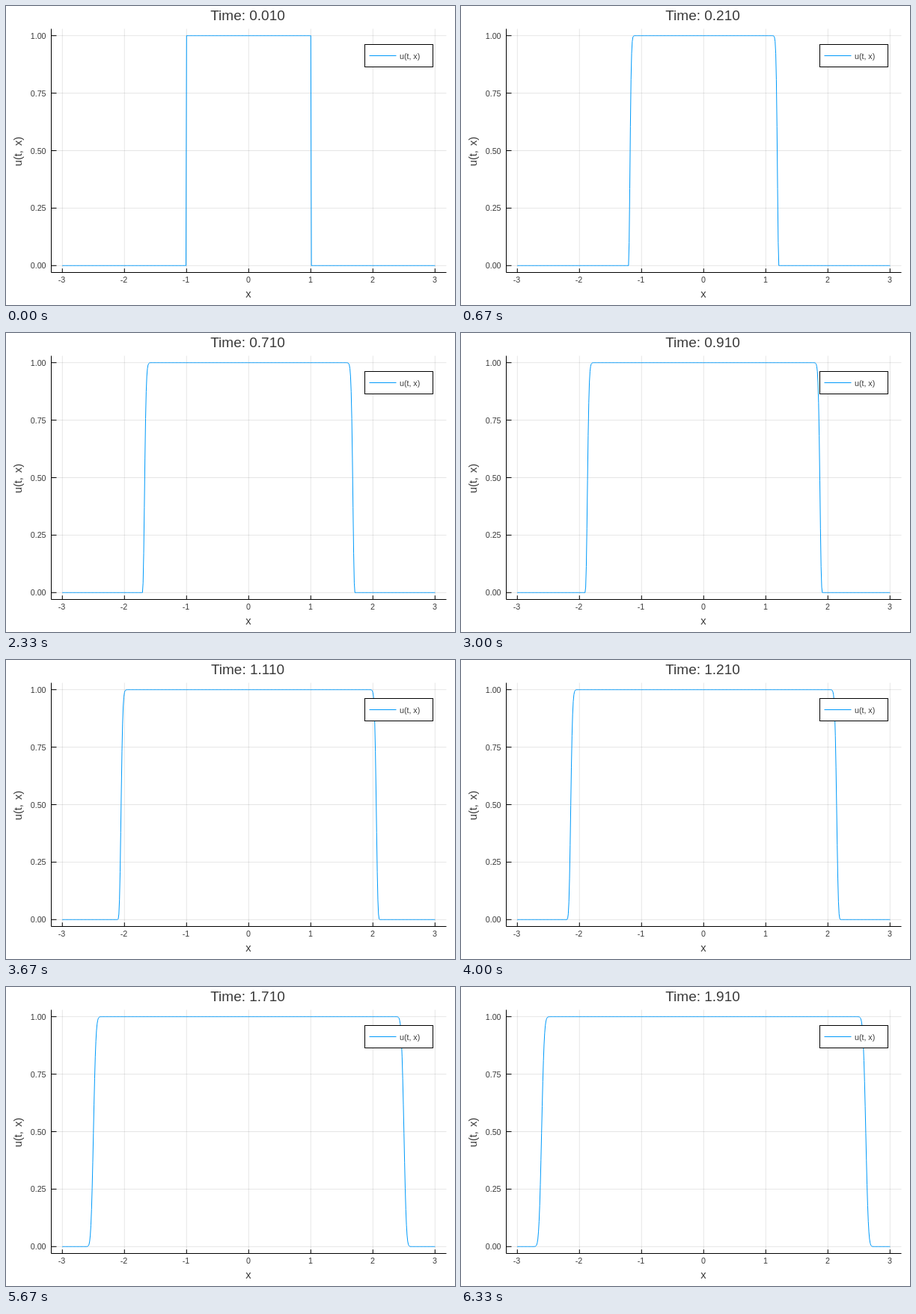
An HTML page that plays this animation: 600x400 px, repeating every 6660 ms.

```html
<!DOCTYPE html>
<html lang="en">
<head>
<meta charset="utf-8">
<title>Advection</title>
<style>
html, body { margin: 0; width: 100%; height: 100%; overflow: hidden; background: #fff; }
svg { display: block; width: 600px; height: 400px; }
text { font-family: "Liberation Sans", Arial, sans-serif; font-size: 10.67px; fill: #3a3a3a; }
path, rect { fill: none; stroke-width: 1; }
.mid { text-anchor: middle; }
.end { text-anchor: end; }
.label { font-size: 14.67px; }
.axis { stroke: #000; }
.grid { stroke: #000; stroke-opacity: .1; }
.curve { stroke: #009afa; stroke-linejoin: round; }
</style>
</head>
<body>
<svg viewBox="0 0 600 400">
  <text id="title" class="mid" x="323" y="19" style="font-size:19px"></text>
  <path id="grid" class="grid"/>
  <path id="ticks" class="axis"/>
  <path class="axis" d="M60.5 30.5V356.5H588.5"/>
  <g id="labels"></g>
  <text class="mid label" x="324" y="389.5">x</text>
  <text class="mid label" transform="translate(20.5 194.5) rotate(-90)" style="word-spacing:2px">u(t, x)</text>
  <path id="curve" class="curve"/>
  <rect class="axis" x="479.5" y="51.5" width="91" height="30" style="fill:#fff"/>
  <path class="curve" d="M485.5 66.5H521.5"/>
  <text x="526" y="71">u(t, x)</text>
</svg>
<script>
const $ = id => document.getElementById(id);
const LOOP = 6660, FRAMES = 20, STEPS = 10, CELLS = 600, H = 0.01;
const px = x => 324.3 + 83 * x;
const py = u => 347.3 - 307.6 * u;

let grid = '', ticks = '', labels = '';
for (let x = -3; x <= 3; x++) {
  grid += `M${px(x)} 30.5V356.5`;
  ticks += `M${px(x)} 356.5v-5.3`;
  labels += `<text class="mid" x="${px(x) - (x < 0 ? 0.9 : 0.4)}" y="370">${x}</text>`;
}
for (let u = 0; u <= 1; u += 0.25) {
  grid += `M60.5 ${py(u)}H588.5`;
  ticks += `M60.5 ${py(u)}h7`;
  labels += `<text class="end" x="53.5" y="${py(u) + 4}">${u.toFixed(2)}</text>`;
}
$('grid').setAttribute('d', grid);
$('ticks').setAttribute('d', ticks);
$('labels').innerHTML = labels;

// First-order upwind scheme for u_t + sin(x) u_x = 0 with equal time and space steps
const xs = Array.from({ length: CELLS + 1 }, (_, i) => (i - CELLS / 2) * H);
const step = u => u.map((v, i) => {
  const upwind = u[i - Math.sign(i - CELLS / 2)];
  return v - Math.abs(Math.sin(xs[i])) * (v - upwind);
});
const toPath = u => 'M' + u.map((v, i) => `${px(xs[i]).toFixed(2)} ${py(v).toFixed(2)}`).join('L');

const curves = [];
let u = xs.map(x => Math.abs(x) < 1 + H / 2 ? 1 : 0);
for (let n = 0; n < FRAMES; n++) {
  curves.push(toPath(u));
  for (let s = 0; s < STEPS; s++) u = step(u);
}

let shown = -1;
function draw() {
  const t = performance.now() % LOOP;
  // Three pictures per second, switching on whole hundredths
  const n = Math.floor((Math.floor(t / 10) + 0.5) * 0.03);
  if (n !== shown) {
    shown = n;
    $('curve').setAttribute('d', curves[n]);
    $('title').textContent = 'Time: ' + (0.01 + n * 0.1).toFixed(3);
  }
  requestAnimationFrame(draw);
}
draw();
</script>
</body>
</html>
```
